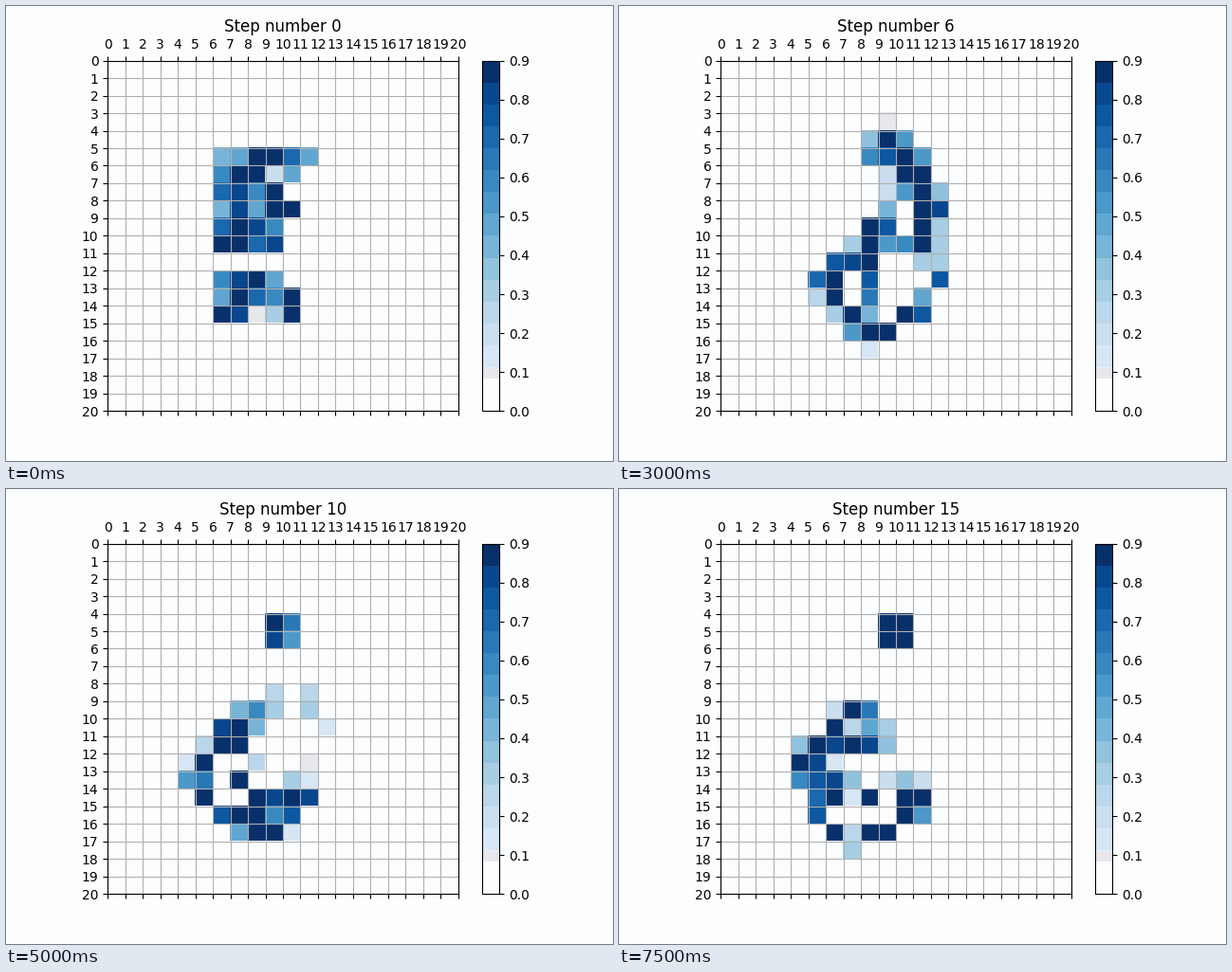
Recreate the animation shown at these times as a matplotlib script. Size 640 px wide and 480 px high, loop 8 s.

```python
import matplotlib.pyplot as plt
import numpy as np
from matplotlib.animation import FuncAnimation
from matplotlib.colors import ListedColormap, to_rgba

SIZE, STEPS, VMAX, BANDS = 20, 16, 0.9, 16
PAPER, MIST = "#fcfdff", "#e8e8ec"
K = np.sqrt(2) + 1

# Starting colony: the only data, all later steps follow from evolve().
# Each row begins at column 6.
SEED = {
    5: [.4, .5, .9, .9, .7, .5],
    6: [.6, .9, .9, .2, .5],
    7: [.7, .8, .6, .9],
    8: [.4, .8, .5, .9, .9],
    9: [.7, .9, .8, .6],
    10: [.9, .9, .7, .8],
    12: [.6, .8, .9, .5],
    13: [.5, .9, .7, .6, .9],
    14: [.9, .8, .1, .3, .9],
}


def first_state():
    cells = np.zeros((SIZE, SIZE))
    for row, values in SEED.items():
        cells[row, 6:6 + len(values)] = values
    return cells


def evolve(cells):
    """Continuous Life: blend death, survival and birth by neighbour sum."""
    n = sum(np.roll(cells, (dy, dx), (0, 1))
            for dy in (-1, 0, 1) for dx in (-1, 0, 1) if dy or dx)
    death = np.maximum(np.where(n <= 2, K * (2 - n), n - 3), 0)
    survive = np.maximum(np.where(n <= 2, n - 1, K * (3 - n)), 0)
    birth = np.maximum(np.where(n <= 3, n - 2, K * (4 - n)), 0)
    return (survive * cells + birth) / (death + survive + birth)


def banded_blues():
    """Blues in equal bands, fading to paper at the low end."""
    blues = plt.get_cmap("Blues")
    level = (np.arange(256) + 0.5) / 256
    band = np.floor(level * BANDS)
    shades = blues((band + 0.5) / BANDS)
    shades[band == BANDS - 1] = blues(1.0)
    shades[level < 0.12] = to_rgba(MIST)
    shades[level < 0.095] = to_rgba(PAPER)
    return ListedColormap(shades)


states = [first_state()]
while len(states) < STEPS:
    states.append(evolve(states[-1]))

fig, ax = plt.subplots(figsize=(6.4, 4.8), dpi=100, facecolor=PAPER)
ax.set_facecolor(PAPER)
image = ax.matshow(states[0], cmap=banded_blues(), vmin=0, vmax=VMAX,
                   extent=(0, SIZE, SIZE, 0), interpolation="nearest")
ax.set_xticks(range(SIZE + 1))
ax.set_yticks(range(SIZE + 1))
ax.grid(True)
fig.colorbar(image, ax=ax, ticks=np.arange(10) / 10)
title = ax.set_title("Step number 0", pad=5.28)


def draw(step):
    image.set_data(states[step])
    title.set_text(f"Step number {step}")
    return image, title


anim = FuncAnimation(fig, draw, frames=STEPS, interval=500,
                     repeat=True, repeat_delay=0)
plt.show()
```
